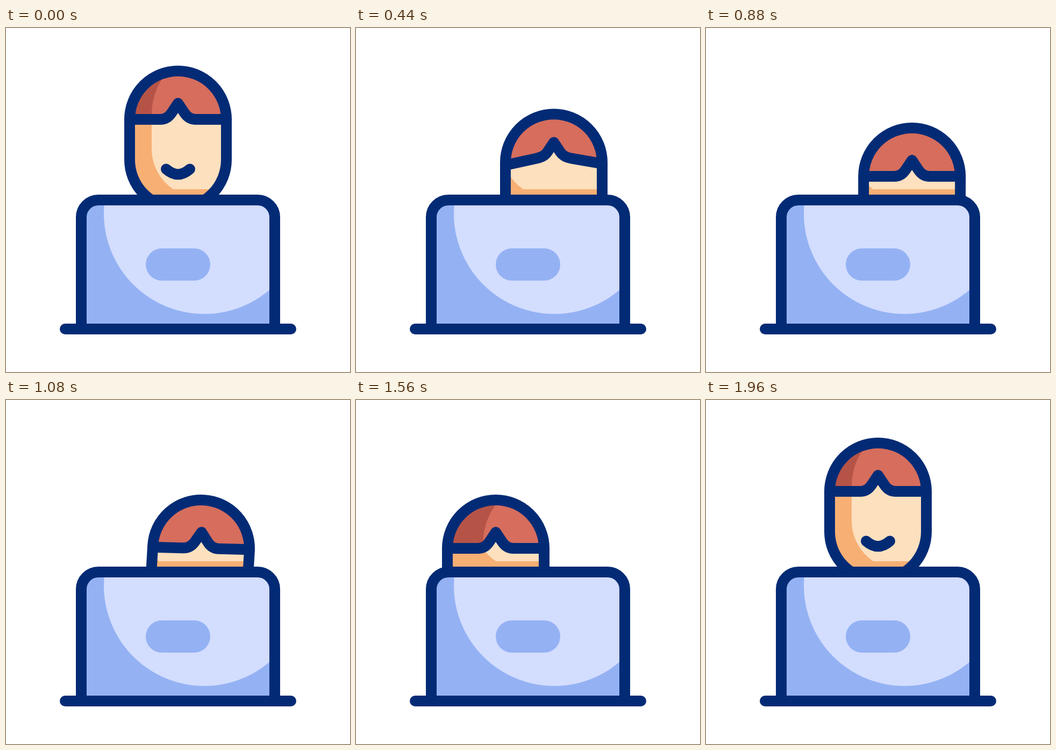
Recreate the animation shown at these times as an HTML page with a canvas. Size 640 px wide and 640 px high, loop 2 s.

```html
<!DOCTYPE html>
<html lang="en">
<head>
<meta charset="utf-8">
<title>Peeking over the laptop</title>
<style>
  html, body { margin: 0; width: 100%; height: 100%; overflow: hidden; background: #fff; }
  canvas { display: block; width: 640px; height: 640px; }
</style>
</head>
<body>
<canvas id="stage"></canvas>
<script>
const LOOP = 2000, STEP = 40;
const INK = '#032b75', HAIR = '#d66d5d', HAIR_DARK = '#b65347';
const SKIN = '#fde0be', SKIN_DARK = '#f7af74';
const LID = '#d3ddfe', LID_DARK = '#94b2f3';

const canvas = document.getElementById('stage');
const ctx = canvas.getContext('2d');
const dpr = window.devicePixelRatio || 1;
canvas.width = canvas.height = 640 * dpr;

const unit = (t, a, b) => Math.min(1, Math.max(0, (t - a) / (b - a)));
const smooth = (t, a, b) => { const u = unit(t, a, b); return u * u * (3 - 2 * u); };
const steep = (t, a, b, p) => {
  const u = unit(t, a, b), x = u ** p;
  return x / (x + (1 - u) ** p);
};
const hump = s => 4 * s * (1 - s);
const rad = deg => deg * Math.PI / 180;

function pose(t) {
  const drop = smooth(t, 67, 617);
  const slide = steep(t, 727, 1620, 3.8);
  const rise = smooth(t, 1667, 1933);
  const stay = 1 - rise;
  const shade = (1 - (1 - slide) ** 4) * stay;
  return {
    x: 320 + (63.5 * drop - 123.5 * slide) * stay,
    y: 170 + 106 * drop * stay,
    bendIn: hump(smooth(t, 20, 640)),
    bendOut: hump(smooth(t, 1667, 1960)),
    tilt: 6 * hump(slide),
    faceShade: -51 * shade,
    hairShade: -34.5 * shade
  };
}

function stroke(path) {
  ctx.strokeStyle = INK;
  ctx.lineWidth = 20;
  ctx.lineCap = ctx.lineJoin = 'round';
  ctx.stroke(path);
}

function fill(path, color) {
  ctx.fillStyle = color;
  ctx.fill(path);
}

function turned(path, deg) {
  const out = new Path2D();
  const c = Math.cos(rad(deg)), s = Math.sin(rad(deg));
  out.addPath(path, new DOMMatrix([c, s, -s, c, 0, 0]));
  return out;
}

// Head parts are built around the centre of the skull dome.
function skull() {
  const p = new Path2D();
  p.arc(0, 0, 90, Math.PI, 0);
  p.lineTo(90, 75);
  p.arc(0, 75, 90, 0, Math.PI);
  p.closePath();
  return p;
}

function fringe(left, mid, right, closed) {
  const p = new Path2D();
  p.moveTo(-90, left);
  p.lineTo(-33, mid);
  p.bezierCurveTo(-24, mid + 0.16 * (mid - left), -17, mid - 4.5, -12, mid - 12);
  p.lineTo(0, mid - 30);
  p.lineTo(12, mid - 12);
  p.bezierCurveTo(17, mid - 4.5, 24, mid + 0.16 * (mid - right), 33, mid);
  p.lineTo(90, right);
  if (closed) {
    p.lineTo(110, -110);
    p.lineTo(-110, -110);
    p.closePath();
  }
  return p;
}

function faceLight(shift) {
  const p = new Path2D();
  const low = Math.asin(75 / 90);
  p.moveTo(271 + shift, 0);
  p.lineTo(271 + shift, 225);
  p.arc(361 + shift, 225, 90, Math.PI, Math.PI - low, true);
  p.lineTo(640, 300);
  p.lineTo(640, 0);
  p.closePath();
  return p;
}

function drawHead(h) {
  const bend = h.bendIn * 10 + h.bendOut * 4.8;
  const ends = [h.bendIn * 7, -bend, h.bendIn * 3];
  const head = turned(skull(), h.tilt);
  const lean = h.tilt * 0.45;

  ctx.save();
  ctx.translate(h.x, h.y);

  ctx.save();
  ctx.clip(head);
  ctx.translate(-h.x, -h.y);
  ctx.fillStyle = SKIN_DARK;
  ctx.fillRect(0, 0, 640, 640);
  fill(faceLight(h.faceShade), SKIN);
  ctx.translate(h.x, h.y);
  ctx.clip(turned(fringe(...ends, true), lean));
  ctx.fillStyle = HAIR_DARK;
  ctx.fillRect(-110, -110, 220, 220);
  const shine = new Path2D();
  shine.arc(391 + h.hairShade - h.x, -10, 120, 0, Math.PI * 2);
  fill(shine, HAIR);
  ctx.restore();

  stroke(turned(fringe(...ends, false), lean));
  stroke(head);

  const w = 22 + 3.3 * h.bendIn, my = 92.5 - 1.2 * bend;
  const mouth = new Path2D();
  mouth.moveTo(-w, my);
  mouth.quadraticCurveTo(0, my + 19.5, w, my);
  stroke(turned(mouth, h.tilt));
  ctx.restore();
}

function drawLaptop() {
  const lid = new Path2D();
  lid.moveTo(140, 560);
  lid.lineTo(140, 352);
  lid.arcTo(140, 320, 172, 320, 32);
  lid.lineTo(468, 320);
  lid.arcTo(500, 320, 500, 352, 32);
  lid.lineTo(500, 560);

  ctx.save();
  ctx.clip(lid);
  ctx.fillStyle = LID_DARK;
  ctx.fillRect(130, 310, 380, 260);
  const glow = new Path2D();
  glow.arc(369, 345, 187, 0, Math.PI * 2);
  fill(glow, LID);
  ctx.restore();

  const pill = new Path2D();
  pill.arc(290, 440, 30, Math.PI / 2, Math.PI * 1.5);
  pill.arc(350, 440, 30, -Math.PI / 2, Math.PI / 2);
  fill(pill, LID_DARK);

  stroke(lid);
  const base = new Path2D();
  base.moveTo(110, 560);
  base.lineTo(530, 560);
  stroke(base);
}

function draw(t) {
  ctx.setTransform(dpr, 0, 0, dpr, 0, 0);
  ctx.fillStyle = '#fff';
  ctx.fillRect(0, 0, 640, 640);

  // The laptop hides everything below its top edge.
  ctx.save();
  ctx.beginPath();
  ctx.rect(0, 0, 640, 322);
  ctx.clip();
  drawHead(pose(t));
  ctx.restore();
  drawLaptop();
}

let start = null;
function tick(now) {
  if (start === null) start = now;
  const t = (now - start) % LOOP;
  draw(Math.floor(t / STEP) * STEP);
  requestAnimationFrame(tick);
}
draw(0);
requestAnimationFrame(tick);
</script>
</body>
</html>
```
